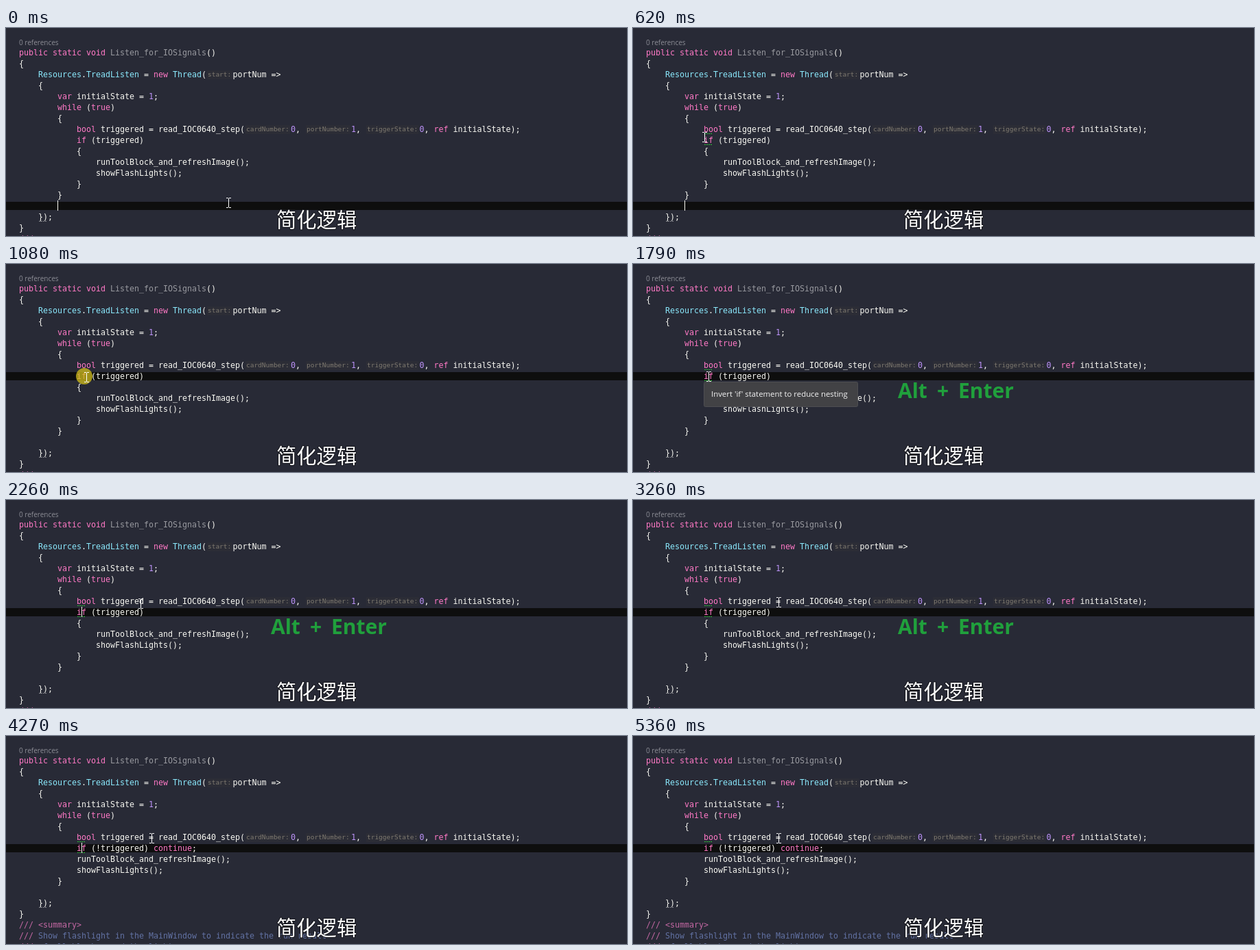
Recreate the animation shown at these times as an HTML page with a canvas. Size 905 by 304 pixels, loop 5.68 s.

```html
<!DOCTYPE html>
<html lang="zh">
<head>
<meta charset="utf-8">
<style>
html, body { margin: 0; overflow: hidden; background: #282a36; }
canvas { display: block; }
</style>
</head>
<body>
<canvas id="stage" width="905" height="304"></canvas>
<script>
const ctx = document.getElementById('stage').getContext('2d');
const LOOP = 5680, LEFT = 19, CHAR = 7, HINT_CHAR = 5.7;
const MONO = '"DejaVu Sans Mono", monospace', UI = '"Open Sans", sans-serif';
const CODE_FONT = `11.63px ${MONO}`, HINT_FONT = `9.47px ${MONO}`;
const WHITE = '#f8f8f2', PINK = '#ff79c6', CYAN = '#8be9fd', PURPLE = '#bd93f9',
  SLATE = '#6272a4', GREEN = '#2fc43a';
const ADVICE = "Invert 'if' statement to reduce nesting";

// Text between « and » is an inline parameter hint.
const head = `public static void Listen_for_IOSignals()
{
    Resources.TreadListen = new Thread(«start:»portNum =>
    {
        var initialState = 1;
        while (true)
        {
            bool triggered = read_IOC0640_step(«cardNumber:»0, «portNumber:»1, «triggerState:»0, ref initialState);
`;
const tail = `        }

    });
}
/// <summary>
/// Show flashlight in the MainWindow to indicate the run result
/// of all blocks, and the lights`;
const nested = (head + `            if (triggered)
            {
                runToolBlock_and_refreshImage();
                showFlashLights();
            }
` + tail).split('\n');
const flat = (head + `            if (!triggered) continue;
            runToolBlock_and_refreshImage();
            showFlashLights();
` + tail).split('\n');

const TOKEN = /«.*?»|\/\/\/|<\w+>|\w+|\s+|[^\w\s]/g;
const KEYWORD = /^(public|static|void|new|var|while|true|bool|if|ref|continue)$/;
const lineY = row => 36 + 16 * row;
const within = (t, from, to) => t >= from && t < to;

function rect(color, x, y, w, h) {
  ctx.fillStyle = color;
  ctx.fillRect(x, y, w, h);
}

function text(str, x, y, font, color, align = 'left') {
  ctx.font = font;
  ctx.fillStyle = color;
  ctx.textAlign = align;
  ctx.fillText(str, x, y);
}

function tokenColor(token) {
  if (KEYWORD.test(token)) return PINK;
  if (/^\d+$/.test(token)) return PURPLE;
  if (/^(Resources|TreadListen|Thread)$/.test(token)) return CYAN;
  return token === 'Listen_for_IOSignals' ? '#98999f' : WHITE;
}

function commentColor(token) {
  return /^(\/|<)/.test(token) ? '#c468a4' : SLATE;
}

function drawLine(line, row) {
  const pick = line.startsWith('///') ? commentColor : tokenColor;
  const y = lineY(row) + 4;
  let x = LEFT;
  for (const token of line.match(TOKEN) || []) {
    if (token[0] === '«') {
      const label = token.slice(1, -1), width = label.length * HINT_CHAR + 4.3;
      rect('#2c2d36', x + 1, y - 10, width - 2, 13);
      text(label, x + 2, y - 1, HINT_FONT, '#7f7a70');
      x += width;
    } else {
      text(token, x, y, CODE_FONT, pick(token));
      x += token.length * CHAR;
    }
  }
}

function dots(x, y, color) {
  for (let i = 0; i < 4; i++) rect(color, x + 3 * i, y, 2, 1);
}

function drawCaret(x, row) {
  rect(WHITE, x, lineY(row) - 8, 1, 15);
}

// Each move: first step, last step, number of steps, end point.
const moves = [
  [70, 540, 7, 118, 148], [620, 620, 1, 104, 159], [710, 860, 3, 117, 165],
  [1170, 1170, 1, 110, 164], [2100, 2330, 4, 212, 149]
];

function pointer(t) {
  let x = 324, y = 255;
  for (const [from, to, steps, endX, endY] of moves) {
    if (t < from) break;
    const gap = (to - from) / (steps - 1) || 1;
    const p = Math.min(steps, Math.floor((t - from) / gap + 1e-6) + 1) / steps;
    const ease = p * p * (3 - 2 * p);
    x += (endX - x) * ease;
    y += (endY - y) * ease;
  }
  return [Math.round(x), Math.round(y)];
}

function drawPointer(x, y) {
  rect('#fff', x, y - 6, 1, 13);
  for (const edge of [y - 7, y + 7]) {
    rect('#fff', x - 3, edge, 3, 1);
    rect('#fff', x + 1, edge, 3, 1);
  }
}

function drawTooltip() {
  ctx.beginPath();
  ctx.roundRect(103.5, 172.5, 224, 36, 2);
  ctx.fillStyle = '#424245';
  ctx.fill();
  ctx.lineWidth = 1;
  ctx.strokeStyle = '#4e4e52';
  ctx.stroke();
  text(ADVICE, 114, 194, `11.4px ${UI}`, '#f4f4f4');
}

function drawMenu() {
  rect('#1b1b1c', 0, 180, 227, 51);
  rect('#3e3e40', 0, 181, 225, 22);
  rect('#333337', 226, 180, 1, 51);
  rect('#333337', 0, 230, 227, 1);
  text(ADVICE + '"', 198, 220, `11.4px ${UI}`, '#f4f4f4', 'right');
  ctx.beginPath();
  ctx.moveTo(212, 212);
  ctx.lineTo(216, 216);
  ctx.lineTo(212, 220);
  ctx.fillStyle = '#d5e0d5';
  ctx.fill();
}

function drawShortcut() {
  const font = `bold 30px ${UI}`;
  text('Alt', 386, 196, font, '#20a03c');
  text('+', 443, 196, font, '#20a03c');
  text('Enter', 474, 196, font, '#20a03c');
}

function drawSubtitle() {
  ctx.lineWidth = 2;
  ctx.lineJoin = 'round';
  ctx.strokeStyle = '#15161c';
  ctx.font = '500 29.3px "Noto Sans CJK SC", "Noto Sans CJK", sans-serif';
  ctx.textAlign = 'left';
  ctx.strokeText('简化逻辑', 394, 291);
  text('简化逻辑', 394, 291, ctx.font, '#fff');
}

function draw(t) {
  const clicked = t >= 1080, refactored = t >= 4270, menuOpen = within(t, 3420, 4270);
  const lines = refactored ? flat : nested;

  rect('#282a36', 0, 0, 905, 304);
  rect(menuOpen ? '#222322' : '#0e0e0e', 0, lineY(clicked ? 8 : 14) - 6, 905, 12);
  text('0 references', LEFT, 25, `10px ${UI}`, '#8c8d95');
  lines.forEach(drawLine);

  dots(48, lineY(refactored ? 13 : 15) + 6, '#85868c');
  if (within(t, 300, 1080) || t >= 1570) {
    dots(104, 154, GREEN);
    if (t < 4450) dots(104, 170, GREEN);
  }

  if (!clicked && !within(t, 70, 620)) drawCaret(75, 14);
  if (within(t, 1170, 1650) || within(t, 2190, 2330) || within(t, 2730, 3260) ||
      within(t, 4270, 5360)) drawCaret(110, 8);

  if (within(t, 930, 1080) || within(t, 1650, 1960)) drawTooltip();
  if (within(t, 1790, 3970)) drawShortcut();
  if (menuOpen) drawMenu();
  if (within(t, 1080, 1170)) {
    ctx.beginPath();
    ctx.arc(114, 164, 12, 0, 2 * Math.PI);
    ctx.fillStyle = 'rgba(208, 188, 28, .76)';
    ctx.fill();
  }
  drawSubtitle();
  drawPointer(...pointer(t));
}

const start = performance.now();
function frame() {
  draw((performance.now() - start) % LOOP);
  requestAnimationFrame(frame);
}
frame();
</script>
</body>
</html>
```
